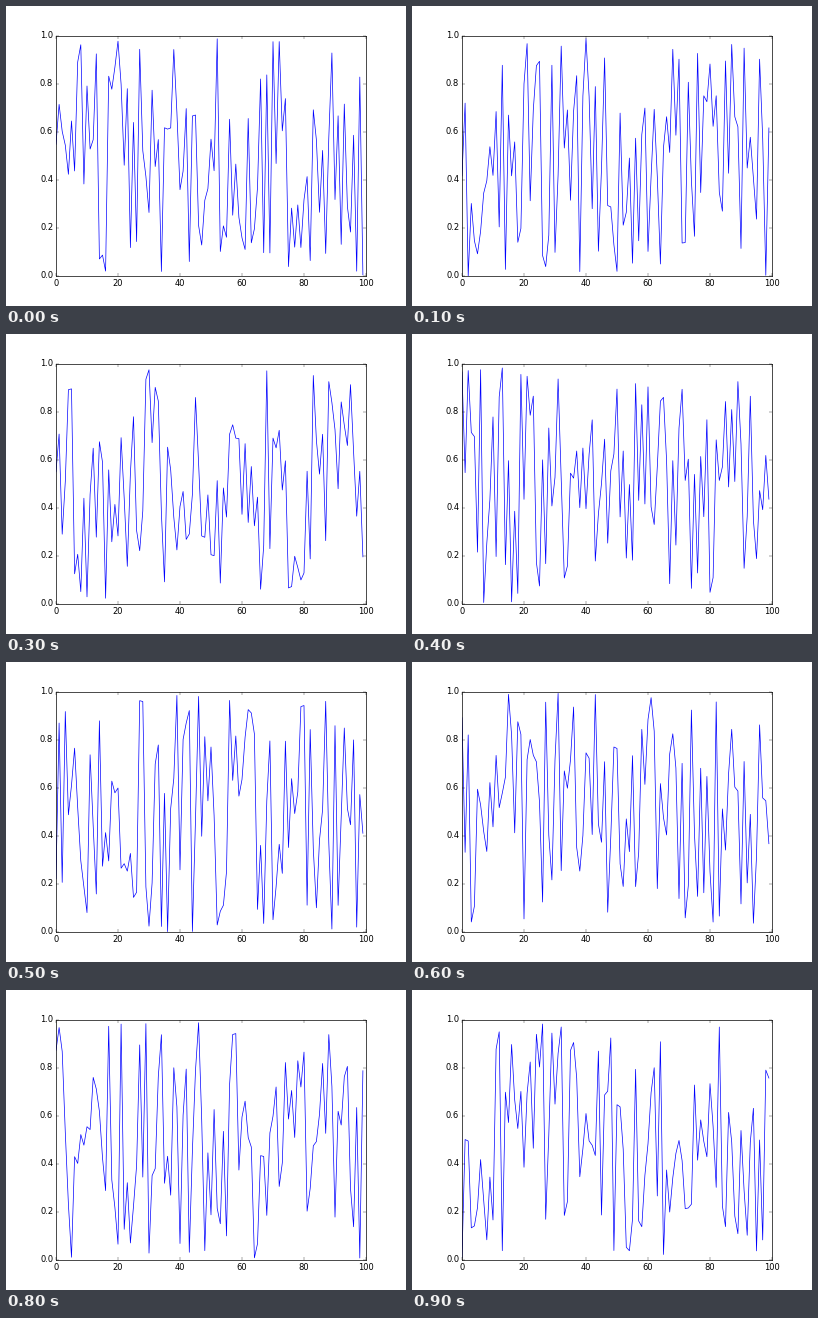
Recreate the animation shown at these times as a matplotlib script. Size 400 px wide and 300 px high, loop 1000 ms.

```python
import numpy as np
import matplotlib.pyplot as plt
from matplotlib.animation import FuncAnimation

FRAMES, INTERVAL, POINTS = 10, 100, 100

plt.style.use("classic")
plt.rcParams.update({
    "font.family": "DejaVu Sans",
    "figure.facecolor": "white",
    "savefig.dpi": "figure",
})

fig, ax = plt.subplots(figsize=(8, 6), dpi=50)
ax.set_xlim(0, 100)
ax.set_ylim(0, 1)
line, = ax.plot([], [], color="blue", linewidth=1)


def draw(frame):
    """Show a fresh set of uniform noise, fixed for each frame number."""
    noise = np.random.RandomState(frame)
    line.set_data(np.arange(POINTS), noise.rand(POINTS))
    return line,


anim = FuncAnimation(fig, draw, frames=FRAMES, interval=INTERVAL,
                     init_func=lambda: draw(0), repeat=True, repeat_delay=0)
plt.show()
```
